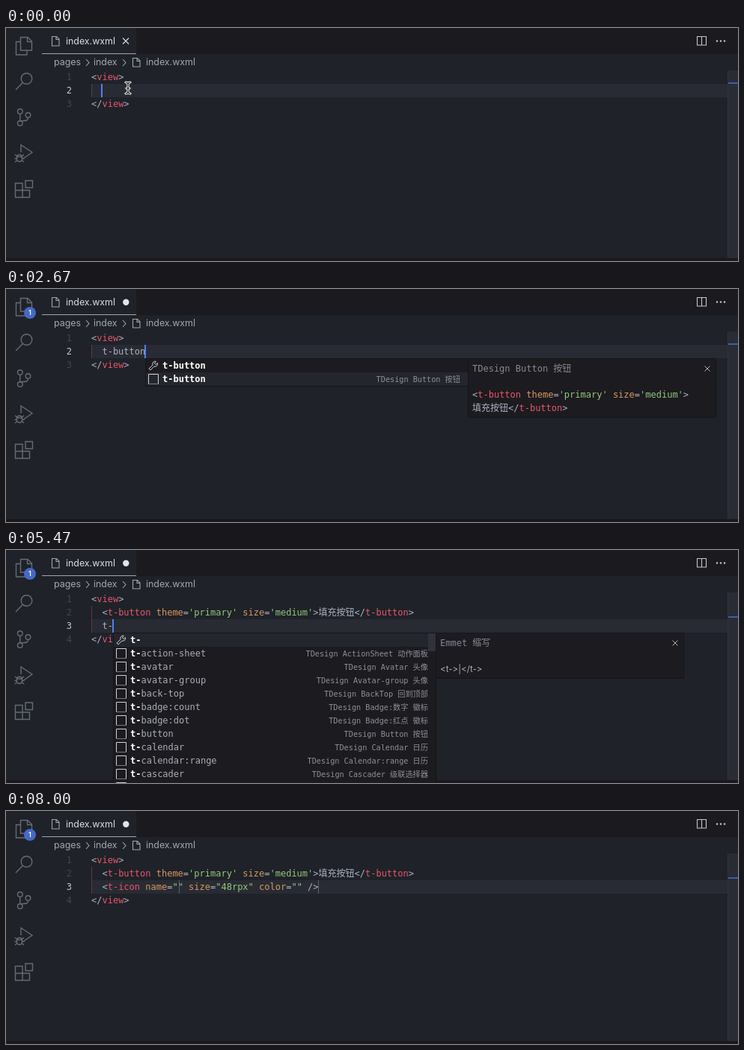
An HTML page that plays this animation: 978 px wide and 313 px high, repeating every 8.03 s.

```html
<!DOCTYPE html>
<html lang="zh-CN">
<head>
<meta charset="utf-8">
<title>Editor snippets</title>
<style>
  html, body { margin: 0; width: 100%; height: 100%; overflow: hidden; background: #1f2229; }
  #stage { position: relative; width: 978px; height: 313px; overflow: hidden; background: #1f2229;
    font: 12px/18px "DejaVu Sans Mono", "Noto Sans CJK SC", "Noto Sans CJK", monospace; color: #abb2bf;
    font-variant-ligatures: none; font-feature-settings: "calt" 0, "liga" 0; }
  #stage div, #stage svg { position: absolute; white-space: pre; }
  #stage .ui { font: 12.4px/18px Inter, "Liberation Sans", sans-serif; color: #a3a7af;
    font-variant-ligatures: none; font-feature-settings: "calt" 0, "liga" 0; }
  #stage .ui.title { color: #dcdee2; }
  #tabs { left: 174px; top: 0; width: 804px; height: 35px; background: #1b1a1f; }
  #tabline { left: 48px; top: 34px; width: 126px; height: 1px; background: #a3a6ac; }
  #foot { left: 0; top: 309px; width: 978px; height: 4px; background: #1b191e; }
  #current { left: 114px; width: 850px; height: 18px; background: #282b33; }
  #ruler { left: 964px; top: 57px; width: 13px; height: 252px; background: #292c34; border-left: 1px solid #30333c; }
  #mark { left: 965px; width: 13px; height: 2px; background: #3d5fa8; }
  #caret { width: 2px; height: 18px; background: #4f80f0; }
  .num { left: 64px; width: 24px; text-align: right; color: #41464f; }
  .num.on { color: #c3c8d1; }
  .line { left: 114px; }
  .guide { left: 114px; width: 1px; height: 18px; }
  .stop { width: 1px; height: 18px; background: #5b606a; }
  .tag { color: #e8566a; } .attr { color: #d8985f; } .str { color: #93c97c; }
  #list, #info { background: #1c1b20; border: 1px solid #15151a; box-sizing: border-box; }
  #list { width: 432px; overflow: hidden; }
  #list .row { left: 0; width: 430px; height: 18px; box-sizing: border-box; padding: 0 10px 0 22px;
    display: flex; align-items: baseline; justify-content: space-between; color: #a9aeb8; }
  #list .row.on { background: #24262e; }
  #list .row span { flex: none; }
  #list .row b { color: #fff; }
  #list .row i { font-style: normal; font-size: 10.2px; color: #8d9199; margin-left: 22px;
    overflow: hidden; text-overflow: ellipsis; }
  #list .row svg { left: 3px; top: 2px; }
  #thumb { right: 0; top: 0; width: 10px; background: #30323c; }
  #info { width: 332px; }
  #info .head { left: 5px; top: 4px; color: #858a94; }
  #info .doc { left: 5px; top: 39px; }
  #stage #info .ui { font-size: 11.6px; color: #aab0bb; }
  #info svg { left: 315px; top: 9px; }
</style>
</head>
<body>
<div id="stage">
  <div id="tabs"></div>
  <div id="tabline"></div>
  <div class="ui title" style="left:80px;top:9px">index.wxml</div>
  <div class="ui" style="left:64px;top:37px">pages</div>
  <div class="ui" style="left:117px;top:37px">index</div>
  <div class="ui" style="left:187px;top:37px">index.wxml</div>
  <div id="foot"></div>
  <div id="current"></div>
  <div id="ruler"></div>
  <div id="mark"></div>
  <div id="code" style="left:0;top:0"></div>
  <div id="caret"></div>
  <svg width="978" height="313" fill="none" stroke="#666b75" stroke-width="1.4" style="left:0;top:0">
    <path d="M19.5 12.5h9.5l5.5 5.5v12h-15zM28.5 12.5v6h6M19.5 18.5h-6v17.5h14.5v-6"/>
    <circle cx="27.5" cy="68" r="7.3"/><path d="M22.3 73.5L13 83"/>
    <circle cx="18.8" cy="112" r="3.3"/><circle cx="18.8" cy="128" r="3.3"/><circle cx="29.5" cy="117" r="3.3"/>
    <path d="M18.8 115.5v9M29.5 120.5c0 4-3 4-6 4-3 0-4.7 0-4.7 1"/>
    <path d="M20 167v-10l15 10-11.5 8"/>
    <path d="M14.5 173a3.6 3.6 0 0 1 7 0v3a3.5 3.5 0 0 1-7 0zM14.5 173h7M12 170l2.5 2M24 170l-2.5 2M11.5 175.5h3M21.5 175.5h3M12 180l2.5-2M24 180l-2.5-2"/>
    <path d="M12.5 208.5h9.5v19h-9.5zM12.5 218h19v9.5h-9.5M26 205h9.5v9.5h-9.5z"/>
    <g stroke="#a0a5ae" stroke-width="1.1">
      <path d="M61.5 11.5h6l3.5 3.5v9h-9.5zM67 11.5v4h4"/>
      <path d="M169.5 40.5h6l3.5 3.5v8h-9.5zM175 40.5v4h4"/>
      <path d="M107 42l4 4.5-4 4.5M156 42l4 4.5-4 4.5"/>
    </g>
    <path stroke="#c5c8ce" stroke-width="1.1" d="M923.5 11.5h12v11.5h-12zM929.5 11.5v11.5"/>
    <g fill="#c5c8ce" stroke="none"><circle cx="950" cy="17.5" r="1.2"/><circle cx="955" cy="17.5" r="1.2"/><circle cx="960" cy="17.5" r="1.2"/></g>
    <g id="clean">
      <path stroke="#d5d7db" stroke-width="1.2" d="M156 13.5l8 8M164 13.5l-8 8"/>
      <g stroke-linecap="round">
        <path stroke="#fff" stroke-width="3.2" d="M160 73q3 0 3 2.5v10q0 2.5-3 2.5M166 73q-3 0-3 2.5v10q0 2.5 3 2.5M161 81h4"/>
        <path stroke="#17181c" stroke-width="1.2" d="M160 73q3 0 3 2.5v10q0 2.5-3 2.5M166 73q-3 0-3 2.5v10q0 2.5 3 2.5M161 81h4"/>
      </g>
    </g>
    <g id="dirty" stroke="none">
      <circle cx="160.3" cy="17.7" r="4.2" fill="#e3e4e7"/>
      <circle cx="32" cy="32" r="8" fill="#4569c4"/>
      <text x="32" y="35.3" fill="#fff" text-anchor="middle" font-family="Inter, sans-serif" font-size="9" font-weight="600">1</text>
    </g>
  </svg>
  <div id="list"></div>
  <div id="info"></div>
</div>
<script>
const LOOP = 8030, CH = 7.224, LEFT = 114, TOP = 57, ROW = 18;
const BUTTON = "<t-button theme='primary' size='medium'>填充按钮</t-button>";
const ICON = '<t-icon name="" size="48rpx" color="" />';

// Each entry is "label|component|description"; brackets mark fuzzy matches.
const lists = {
  all: ["t-action-sheet|ActionSheet|动作面板", "t-avatar|Avatar|头像", "t-avatar-group|Avatar-group|头像",
    "t-back-top|BackTop|回到顶部", "t-badge:count|Badge:数字|徽标", "t-badge:dot|Badge:红点|徽标",
    "t-button|Button|按钮", "t-calendar|Calendar|日历", "t-calendar:range|Calendar:range|日历",
    "t-cascader|Cascader|级联选择器", "t-cell|Cell|单元格"],
  b: ["t-back-top|BackTop|回到顶部", "t-badge:count|Badge:数字|徽标", "t-badge:dot|Badge:红点|徽标",
    "t-button|Button|按钮", "[t-]notice-[b]ar|NoticeBar|公告栏", "[t-]side-[b]ar|SideBar|侧边栏",
    "[t-]ta[b]s|Tabs|选项卡", "[t-]tab-[b]ar|TabBar|标签栏", "[t-]nav[b]ar|Navbar|导航栏",
    "[t-]checkbox|Checkbox|多选框"],
  bu: ["t-button|Button|按钮", "[t-b]adge:co[u]nt|Badge:数字|徽标"],
  button: ["t-button|Button|按钮"],
  i: ["t-icon|Icon|图标", "t-image|Image|图片", "t-image-viewer|ImageViewer|图片预览", "t-indexes|Indexes|索引",
    "t-input|Input|输入框", "[t-]act[i]on-sheet|ActionSheet|动作面板", "[t-]d[i]alog:confirm|Dialog:confirm|对话框",
    "[t-]d[i]vider|Divider|分割线", "[t-]sw[i]per|Swiper|轮播图", "[t-]sw[i]pe-cell|SwipeCell|滑动操作",
    "[t-]not[i]ce-bar|NoticeBar|公告栏"],
  icon: ["t-icon|Icon|图标", "[t-]swipe-cell:[icon]|SwipeCell:icon|滑动操作", "[t-]d[i]alog:[con]firm|Dialog:confirm|对话框",
    "[t-]d[i]alog:[con]firm,cancel|Dialog:confirm,cancel|对话框", "[t-]sw[i]per:[con]trols|Swiper:controls|轮播图",
    "[t-]a[c]t[ion]-sheet|ActionSheet|动作面板", "[t-]collapse:r[i]ght-[con]tent|Collapse:操作说明|折叠面板",
    "[t-]not[ic]e-bar:horiz[on]tal|NoticeBar:horizontal|公告栏滚动", "[t-]swiper:fra[c]t[ion]|Swiper:fraction|轮播图",
    "[t-c]ount-down:m[i]llisec[on]d|CountDown:millisecond|倒计时", "[t-]d[i]alog:[c]ancel-butt[on]|Dialog:cancel|对话框"]
};
// Scrollbar thumb height of the lists that overflow.
const thumbs = { all: 24, b: 120, i: 90, icon: 204 };

// time, finished lines, text of the current line, open list, selected row
const steps = [
  [0, 0, ""], [400, 0, "t"], [500, 0, "t", "all", 0], [800, 0, "t-", "all", 0],
  [1270, 0, "t-b", "b", 0], [1410, 0, "t-bu", "bu", 0], [1540, 0, "t-but", "button", 0],
  [1690, 0, "t-butt", "button", 0], [1960, 0, "t-butto", "button", 0], [2130, 0, "t-button", "button", 0],
  [2560, 0, "t-button", "button", 1], [2920, 0, BUTTON],
  [3530, 1, ""], [3980, 1, "t"], [4080, 1, "t", "all", 0], [4440, 1, "t-", "all", 0],
  [5750, 1, "t-i", "i", 0], [6100, 1, "t-ic", "icon", 0], [6350, 1, "t-ico", "icon", 0],
  [6600, 1, "t-icon", "icon", 0], [7050, 1, "t-icon", "icon", 1], [7360, 1, ICON]
];

const $ = id => document.getElementById(id);
const esc = s => s.replace(/</g, "&lt;");
const span = (cls, s) => `<span class="${cls}">${s}</span>`;
const at = (cls, x, y, html = "") => `<div class="${cls}" style="left:${x}px;top:${y}px">${html}</div>`;
const show = (id, on) => { $(id).style.display = on ? "" : "none"; };
const place = (id, x, y) => { $(id).style.left = x + "px"; $(id).style.top = y + "px"; };

function paint(src) {
  return src.replace(/(<\/?)([\w-]+)|([\w-]+)(?==)|('[^']*'|"[^"]*")/g, (m, open, tag, attr, str) =>
    tag ? esc(open) + span("tag", tag) : attr ? span("attr", attr) : span("str", str));
}

const svg = (body, size = 14, color = "#d2d4d8") =>
  `<svg width="${size}" height="${size}" fill="none" stroke="${color}">${body}</svg>`;
const wrench = svg('<path d="M12.5 3.5l-2.5 2-1.7-1.7 2-2.5a3.6 3.6 0 0 0-4.3 4.8l-5 5 1.9 1.9 5-5a3.6 3.6 0 0 0 4.6-4.5z"/>');
const snippet = svg('<path d="M.5 13v-12.5h13v12.5"/><path stroke-dasharray="1 1" d="M.5 13.5h13"/>');
const cross = svg('<path d="M.5.5l7 7M7.5.5l-7 7"/>', 8, "#b4b7bd");

function label(name, typed) {
  if (name.includes("[")) return name.replace(/\[/g, "<b>").replace(/]/g, "</b>");
  return `<b>${name.slice(0, typed.length)}</b>${name.slice(typed.length)}`;
}

function drawPopup(typed, key, sel, x, y) {
  const items = lists[key].map(s => s.split("|"));
  const row = (i, html) => `<div class="row${i === sel ? " on" : ""}" style="top:${i * ROW}px">${html}</div>`;
  const rows = items.map(([name, part, desc], i) =>
    row(i + 1, `${snippet}<span>${label(name, typed)}</span><i>TDesign ${part} ${desc}</i>`));
  $("list").innerHTML = row(0, `${wrench}<span><b>${typed}</b></span>`) + rows.join("") +
    (thumbs[key] ? `<div id="thumb" style="height:${thumbs[key]}px"></div>` : "");
  $("list").style.height = (items.length + 1) * ROW + 2 + "px";
  place("list", x, y);

  let head = "Emmet 缩写", doc = esc(`<${typed}>|</${typed}>`), cls = "doc ui", tall = 62;
  if (sel) {
    const isButton = key === "button";
    head = `TDesign ${items[0][1]} ${items[0][2]}`;
    doc = paint(isButton ? BUTTON.replace(">填", ">\n填") : ICON);
    cls = "doc";
    if (isButton) tall += ROW;
  }
  $("info").innerHTML = `<div class="head">${head}</div>${cross}<div class="${cls}">${doc}</div>`;
  $("info").style.height = tall + "px";
  place("info", x + 431, y);
}

function draw([, done, text, key, sel]) {
  const lines = ["<view>", ...(done ? ["  " + BUTTON] : []), "  " + text, "</view>"];
  const cur = done + 1, y = TOP + cur * ROW;
  let html = "";
  lines.forEach((s, i) => {
    const top = TOP + i * ROW;
    html += `<div class="num${i === cur ? " on" : ""}" style="top:${top}px">${i + 1}</div>` + at("line", LEFT, top, paint(s));
    if (i && i < lines.length - 1)
      html += `<div class="guide" style="top:${top}px;background:${text ? "#653840" : "#444851"}"></div>`;
  });
  const col = 2 + text.length;
  let caretX = LEFT + col * CH;
  if (text === BUTTON) caretX += 4 * (12 - CH);
  if (text === ICON) {
    html += at("stop", LEFT + 16 * CH + 1, y) + at("stop", caretX, y);
    caretX = LEFT + 16 * CH;
  }
  $("code").innerHTML = html;
  $("current").style.top = y + "px";
  $("mark").style.top = 73 + done * 16 + "px";
  place("caret", Math.round(caretX - 1), y);
  show("clean", !done && !text);
  show("dirty", done || text);
  show("list", key);
  show("info", key);
  if (key) drawPopup(text, key, sel, Math.round(LEFT + col * CH), y + ROW);
}

let last = -1;
const start = performance.now();
function frame() {
  const t = Math.max(0, performance.now() - start) % LOOP;
  let n = steps.length - 1;
  while (steps[n][0] > t) n--;
  if (n !== last) draw(steps[last = n]);
  // Blinking restarts on every edit.
  show("caret", (t - steps[n][0]) % 1000 < 500);
  requestAnimationFrame(frame);
}
frame();
</script>
</body>
</html>
```
